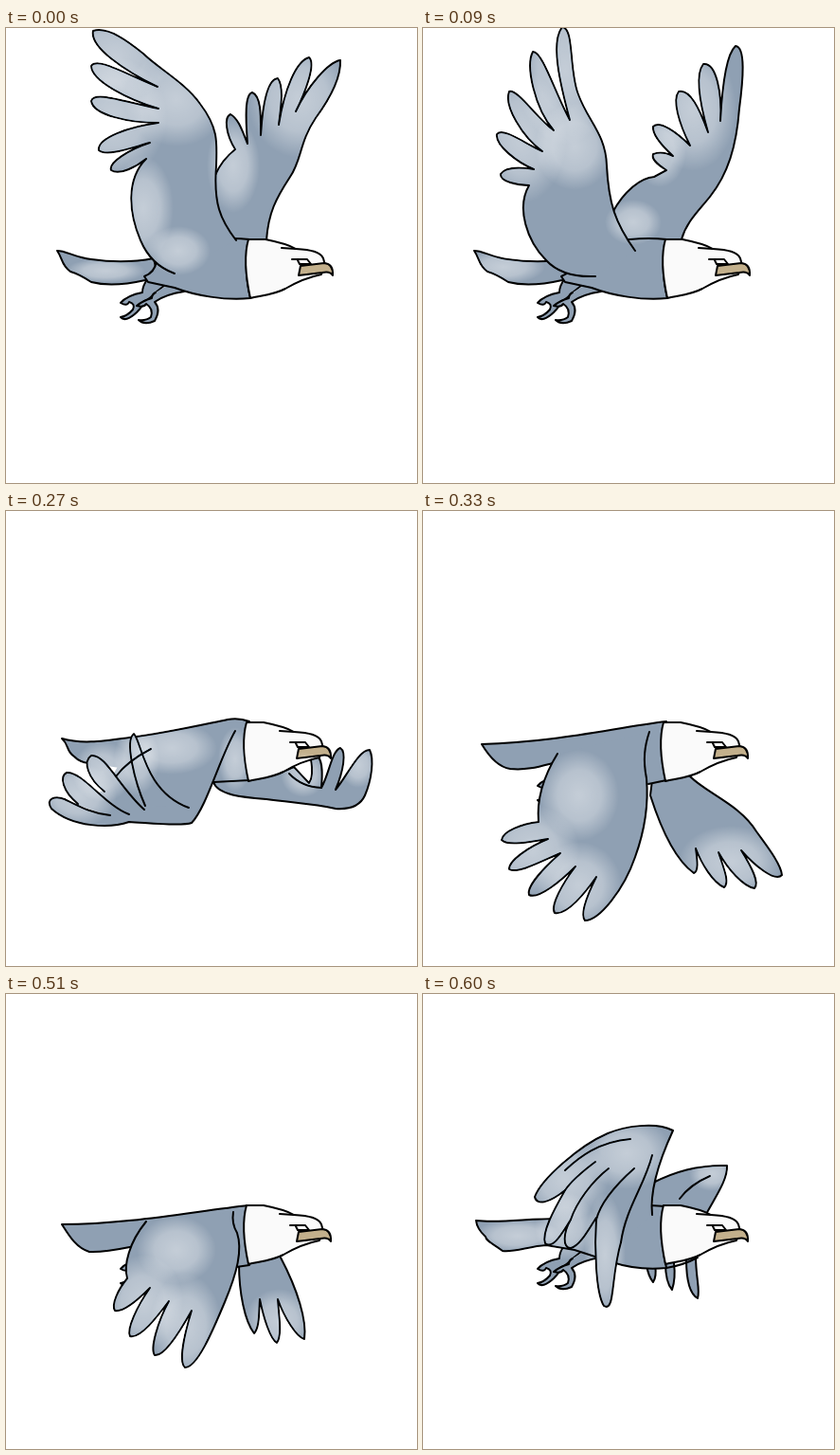
An HTML page without scripts that plays this animation: 434 by 480 pixels, repeating every 0.66 s.

```html
<!DOCTYPE html>
<html lang="en">
<head>
<meta charset="utf-8">
<title>Flying bird</title>
<style>
  html, body { margin: 0; width: 100%; height: 100%; overflow: hidden; background: #fff; }
  svg { display: block; width: 100%; height: 100%; }
  path { fill: #8fa0b3; stroke: #000; stroke-width: 2; stroke-linecap: round; stroke-linejoin: round; }
  .line { fill: none; }
  .flat { stroke: none; }
  .white { fill: #fafafa; }
  .beak { fill: #c3b08c; }

  /* Overlay lightens the grey paint and leaves ink and paper alone. */
  .wash { mix-blend-mode: overlay; fill: url(#glow); }

  .pose { visibility: hidden; animation: long 660ms var(--at) step-end infinite; }
  .short { animation-name: short; }
  @keyframes long { 0% { visibility: visible; } 13.6365% { visibility: hidden; } }
  @keyframes short { 0% { visibility: visible; } 9.0911% { visibility: hidden; } }
</style>
</head>
<body>
<svg viewBox="0 0 434 480">
  <defs>
    <radialGradient id="glow">
      <stop offset="0" stop-color="#fff" stop-opacity=".48"/>
      <stop offset=".55" stop-color="#fff" stop-opacity=".36"/>
      <stop offset="1" stop-color="#fff" stop-opacity="0"/>
    </radialGradient>

    <g id="head">
      <path class="white" d="M256 223 L274 223 C284 225 298 228 306 233 C322 234 332 236 335 243 L337 250 L333 260 C318 263 307 268 295 275 C284 281 272 282 258 285 C253 262 251 240 256 223"/>
      <path class="line" d="M291 232 L306 233 M302 244 L318 244 L322 249 L310 249 L308 245"/>
      <path class="beak" d="M311 251 L336 248 Q346 249 345 261 Q342 256 334 258 L309 261 Z"/>
    </g>

    <g id="feet">
      <path d="M150 264 Q144 272 144 279 Q128 282 121 290 Q128 294 130 289 Q137 291 134 297 Q128 304 121 305 Q126 311 138 300 Q145 293 146 288 Q152 286 158 279 L172 268"/>
      <path d="M158 279 Q154 281 154 285 Q144 288 138 293 Q146 295 148 291 Q156 296 153 305 Q148 309 140 308 Q146 314 157 309 Q164 297 157 289 Q168 281 188 278 L176 268"/>
    </g>

    <g id="body">
      <path d="M54 235 C64 235 72 242 90 244 Q125 249 156 243 L160 262 L147 266 C125 271 105 272 90 268 Q78 260 68 257 C58 250 60 243 54 235"/>
      <use href="#feet"/>
      <path d="M197 226 Q230 220 257 223 C252 240 253 265 258 285 C232 288 199 282 178 274 L150 268 L146 262 Q157 258 159 246"/>
    </g>
  </defs>

  <!-- wings high -->
  <g class="pose" style="--at:0ms">
    <path d="M221 155 Q228 139 242 128 C232 112 230 94 237 91 C246 96 250 110 255 122 C253 95 252 70 260 68 C270 72 269 95 269 113 C271 80 276 54 287 53 C294 62 290 85 288 102 C294 65 306 35 320 31 C328 38 315 70 306 88 C318 62 340 36 353 34 C354 55 338 80 327 95 C310 120 312 140 300 157 C285 180 277 195 275 224 L221 224"/>
    <use href="#body"/>
    <use href="#head"/>
    <path d="M178 259 Q153 250 142 224 C130 196 126 160 148 138 C138 146 120 156 111 150 C108 142 130 128 152 121 C130 127 106 136 98 129 C96 116 130 104 161 100 C130 100 92 92 90 77 C93 66 125 78 161 85 C130 76 90 56 90 40 C96 30 125 48 160 62 C125 45 88 20 92 3 C108 -2 130 15 145 27 C160 42 190 58 205 80 C224 105 223 120 222 145 C219 185 226 202 243 224"/>
    <g class="wash">
      <ellipse cx="115" cy="30" rx="60" ry="48"/>
      <ellipse cx="180" cy="75" rx="55" ry="50"/>
      <ellipse cx="112" cy="95" rx="58" ry="65"/>
      <ellipse cx="145" cy="190" rx="32" ry="55"/>
      <ellipse cx="182" cy="235" rx="34" ry="26"/>
      <ellipse cx="310" cy="75" rx="55" ry="62"/>
      <ellipse cx="240" cy="145" rx="28" ry="50"/>
      <ellipse cx="105" cy="256" rx="42" ry="13"/>
    </g>
  </g>

  <!-- wings tilting back -->
  <g class="pose" style="--at:90ms">
    <path d="M200 195 C212 172 230 158 244 157 L257 150 C246 143 241 138 243 133 C250 130 258 132 264 135 C252 124 242 112 243 104 C250 97 268 110 282 124 C270 100 263 76 270 67 C282 64 292 85 301 110 C291 75 288 48 296 38 C310 36 316 70 314 98 C316 60 320 28 330 19 C341 20 338 55 334 85 C331 125 322 154 303 178 C290 194 278 205 273 223 L210 226"/>
    <use href="#body"/>
    <use href="#head"/>
    <path d="M182 262 C160 263 142 258 130 245 C110 225 98 190 112 166 C100 166 81 162 82 154 C87 146 105 147 117 149 C100 142 76 124 78 112 C84 104 108 122 126 130 C105 115 85 82 91 67 C100 64 120 95 138 108 C118 85 108 40 116 25 C126 24 140 70 155 97 C145 60 134 15 147 -1 C160 0 154 45 164 70 C174 98 193 112 194 145 C196 185 203 206 224 235"/>
    <g class="wash">
      <ellipse cx="150" cy="45" rx="52" ry="78"/>
      <ellipse cx="104" cy="115" rx="48" ry="70"/>
      <ellipse cx="160" cy="125" rx="42" ry="46"/>
      <ellipse cx="285" cy="85" rx="46" ry="66"/>
      <ellipse cx="250" cy="130" rx="28" ry="38"/>
      <ellipse cx="222" cy="205" rx="30" ry="24"/>
      <ellipse cx="85" cy="252" rx="44" ry="18"/>
    </g>
  </g>

  <!-- wings spreading -->
  <g class="pose" style="--at:180ms">
    <path d="M248 221 Q262 204 277 198 C268 186 268 172 277 171 C284 174 286 186 291 192 C283 172 283 152 291 150 C300 154 302 168 305 182 C300 150 302 120 311 118 C320 120 322 145 322 172 C322 135 326 104 335 99 C344 104 342 135 341 160 C346 120 350 92 361 87 C374 88 369 130 362 165 C355 198 335 224 306 233 L290 242"/>
    <use href="#body"/>
    <use href="#head"/>
    <path d="M169 262 C140 263 110 264 102 241 Q82 238 73 229 L77 221 C62 215 50 206 50 196 C57 191 68 199 77 202 C58 190 32 170 34 153 C42 147 65 170 82 181 C60 160 28 125 31 105 C42 98 70 142 99 160 C72 136 55 85 62 68 C76 66 88 124 117 149 C94 110 82 55 110 36 C122 45 122 85 130 113 C136 155 162 168 186 186 C198 195 197 206 196 226"/>
    <path class="line" d="M179 218 C176 240 186 263 203 264 L223 265 M196 226 C200 240 207 246 216 250"/>
    <g class="wash">
      <ellipse cx="108" cy="72" rx="38" ry="65"/>
      <ellipse cx="58" cy="110" rx="38" ry="62"/>
      <ellipse cx="56" cy="178" rx="42" ry="50"/>
      <ellipse cx="105" cy="208" rx="55" ry="38"/>
      <ellipse cx="298" cy="150" rx="36" ry="55"/>
      <ellipse cx="355" cy="105" rx="34" ry="36"/>
      <ellipse cx="238" cy="248" rx="22" ry="32"/>
      <ellipse cx="95" cy="254" rx="50" ry="22"/>
    </g>
  </g>

  <!-- wings level, tips bent up -->
  <g class="pose short" style="--at:270ms">
    <path d="M219 286 C224 300 250 302 275 304 C305 308 325 309 348 314 C362 315 374 311 379 300 C386 284 389 262 384 252 C372 252 360 280 348 294 C356 275 360 254 353 250 C344 253 341 278 333 292 C334 280 335 264 329 259 L322 262 Q325 280 320 287 L304 270 L290 276"/>
    <path class="line" d="M299 277 Q312 291 333 292"/>
    <path d="M219 286 L257 284 C252 262 253 240 257 222 Q246 218 234 220 C200 227 165 235 130 239 C100 243 80 246 59 240 C67 247 63 253 72 259 Q78 265 87 266"/>
    <path class="flat" d="M120 266 L215 281 L198 322 L110 322 L72 309 L104 294 Z"/>
    <use href="#head" x="-2"/>
    <path d="M242 232 C225 262 212 312 196 329 C185 333 150 329 130 328 C110 335 70 334 48 314 C41 303 52 300 62 304 C76 311 90 319 110 321"/>
    <path d="M76 309 C60 296 56 280 64 276 C80 274 105 311 130 320"/>
    <path d="M104 296 C86 282 81 264 90 258 C105 256 120 292 146 315"/>
    <path d="M147 311 C136 286 125 242 135 235 C143 242 146 296 193 313"/>
    <path class="line" d="M153 251 Q128 264 116 280"/>
    <g class="wash">
      <ellipse cx="75" cy="300" rx="42" ry="34"/>
      <ellipse cx="102" cy="275" rx="32" ry="32"/>
      <ellipse cx="138" cy="262" rx="24" ry="38"/>
      <ellipse cx="175" cy="250" rx="48" ry="28"/>
      <ellipse cx="242" cy="262" rx="18" ry="34"/>
      <ellipse cx="314" cy="278" rx="24" ry="24"/>
      <ellipse cx="372" cy="268" rx="20" ry="24"/>
    </g>
  </g>

  <!-- wings pushing down -->
  <g class="pose" style="--at:330ms">
    <path d="M282 280 C300 298 335 310 352 338 C362 352 378 372 379 384 C372 392 350 374 336 358 C346 374 356 392 350 398 C338 396 322 378 312 360 C318 378 324 392 318 397 C306 392 294 372 288 356 C290 370 291 380 286 382 C272 372 256 350 240 300 L242 284"/>
    <use href="#feet"/>
    <path d="M238 288 L257 284 C252 262 253 240 257 222 C200 229 140 244 62 246 C68 256 78 270 92 272 C110 274 125 269 141 265"/>
    <use href="#head" x="-2"/>
    <path d="M142 256 C126 282 120 306 122 328 C104 330 84 338 83 347 C90 354 112 349 132 346 C112 354 90 369 91 378 C100 383 124 370 145 361 C128 376 109 396 112 405 C122 410 146 390 161 375 C148 392 134 416 139 424 C152 427 172 402 183 386 C174 404 165 425 171 432 C186 432 212 400 224 365 C236 332 238 305 236 282 C232 262 234 248 239 233"/>
    <g class="wash">
      <ellipse cx="115" cy="358" rx="50" ry="48"/>
      <ellipse cx="165" cy="395" rx="45" ry="46"/>
      <ellipse cx="165" cy="300" rx="42" ry="48"/>
      <ellipse cx="325" cy="370" rx="55" ry="38"/>
    </g>
  </g>

  <!-- wings lowest -->
  <g class="pose" style="--at:420ms">
    <path d="M282 280 C288 310 318 335 321 382 C330 410 362 440 371 463 C362 473 336 440 320 412 C328 440 341 460 335 467 C322 465 308 440 297 415 C300 435 307 452 301 457 C288 454 280 435 274 408 C278 430 281 442 275 444 C266 437 266 418 258 404 L254 413 L240 290"/>
    <use href="#feet"/>
    <path d="M241 289 L257 284 C252 262 252 240 256 222 C235 223 215 228 190 233 C150 241 100 248 63 248 C67 255 72 258 76 266 C84 274 96 275 108 274 Q126 269 141 266"/>
    <use href="#head" x="-2"/>
    <path class="line" d="M241 289 Q264 285 282 279"/>
    <path d="M142 258 C135 290 146 340 159 361 C148 366 141 373 144 378 C152 382 168 376 184 373 C170 380 151 394 152 401 C160 405 180 395 198 382 C182 400 166 424 170 433 C180 436 200 412 213 396 C200 418 186 446 190 455 C200 460 221 430 229 410 C218 440 207 465 213 473 C225 476 246 438 252 405 C260 378 262 345 254 322 C248 298 228 270 229 251 Q229 240 232 233"/>
    <g class="wash">
      <ellipse cx="166" cy="310" rx="34" ry="46"/>
      <ellipse cx="170" cy="378" rx="36" ry="46"/>
      <ellipse cx="212" cy="365" rx="42" ry="48"/>
      <ellipse cx="205" cy="430" rx="44" ry="55"/>
      <ellipse cx="285" cy="395" rx="36" ry="38"/>
      <ellipse cx="345" cy="445" rx="34" ry="36"/>
    </g>
  </g>

  <!-- wings folding -->
  <g class="pose" style="--at:510ms">
    <path d="M246 284 C246 315 252 345 262 358 C268 352 267 335 268 322 C272 342 279 364 286 368 C292 360 288 338 287 322 C294 342 307 362 315 364 C318 345 308 312 290 278"/>
    <use href="#feet"/>
    <path d="M236 289 L257 286 C252 264 252 240 256 223 C200 229 130 243 59 243 C66 254 74 268 88 272 C105 273 125 268 141 265"/>
    <use href="#head" x="-2"/>
    <path d="M148 240 C130 262 124 286 128 300 C118 312 111 328 115 334 C124 336 140 322 152 310 C138 330 127 354 131 361 C142 364 160 340 172 324 C160 346 152 374 157 381 C168 383 186 352 196 334 C188 360 182 388 189 394 C202 394 218 356 231 325 C244 294 250 270 244 252 Q238 242 240 230"/>
    <g class="wash">
      <ellipse cx="145" cy="325" rx="42" ry="50"/>
      <ellipse cx="190" cy="350" rx="38" ry="55"/>
      <ellipse cx="180" cy="270" rx="42" ry="36"/>
      <ellipse cx="288" cy="345" rx="36" ry="34"/>
    </g>
  </g>

  <!-- wings lifting -->
  <g class="pose short" style="--at:600ms">
    <path d="M236 286 Q238 298 243 304 Q247 298 245 286 M256 284 Q256 304 263 312 Q267 300 265 284 M278 280 C278 300 281 316 290 321 C293 312 288 300 288 276"/>
    <path d="M243 199 C268 186 295 180 321 181 C322 196 308 215 298 234 L243 232"/>
    <use href="#feet"/>
    <path d="M56 239 C80 242 110 237 140 237 L240 223 L256 224 C251 242 252 266 257 289 C235 291 215 288 200 283 L160 270 L130 265 C112 266 96 273 84 271 C72 262 67 261 66 256 Q57 248 56 239"/>
    <use href="#head" x="-2"/>
    <path class="line" d="M257 289 Q275 286 290 278 M303 192 Q282 201 271 216"/>
    <path d="M242 233 C239 205 252 170 264 144 C245 134 212 140 195 147 C165 160 125 195 118 214 C120 224 134 220 150 207 C138 228 125 252 129 263 C138 270 148 250 156 238 C148 252 147 268 156 268 C166 266 176 246 183 236 C181 265 182 315 191 329 C203 336 198 300 209 262"/>
    <path class="line" d="M219 153 C185 156 165 172 150 186 M182 177 Q158 195 150 207 M196 184 C178 198 162 220 156 238 M223 184 C205 200 188 218 183 238 M242 170 C234 202 214 226 209 262"/>
    <g class="wash">
      <ellipse cx="150" cy="195" rx="46" ry="44"/>
      <ellipse cx="150" cy="245" rx="32" ry="36"/>
      <ellipse cx="215" cy="168" rx="48" ry="38"/>
      <ellipse cx="192" cy="275" rx="22" ry="65"/>
      <ellipse cx="100" cy="255" rx="46" ry="18"/>
      <ellipse cx="305" cy="190" rx="24" ry="18"/>
    </g>
  </g>
</svg>
</body>
</html>
```
